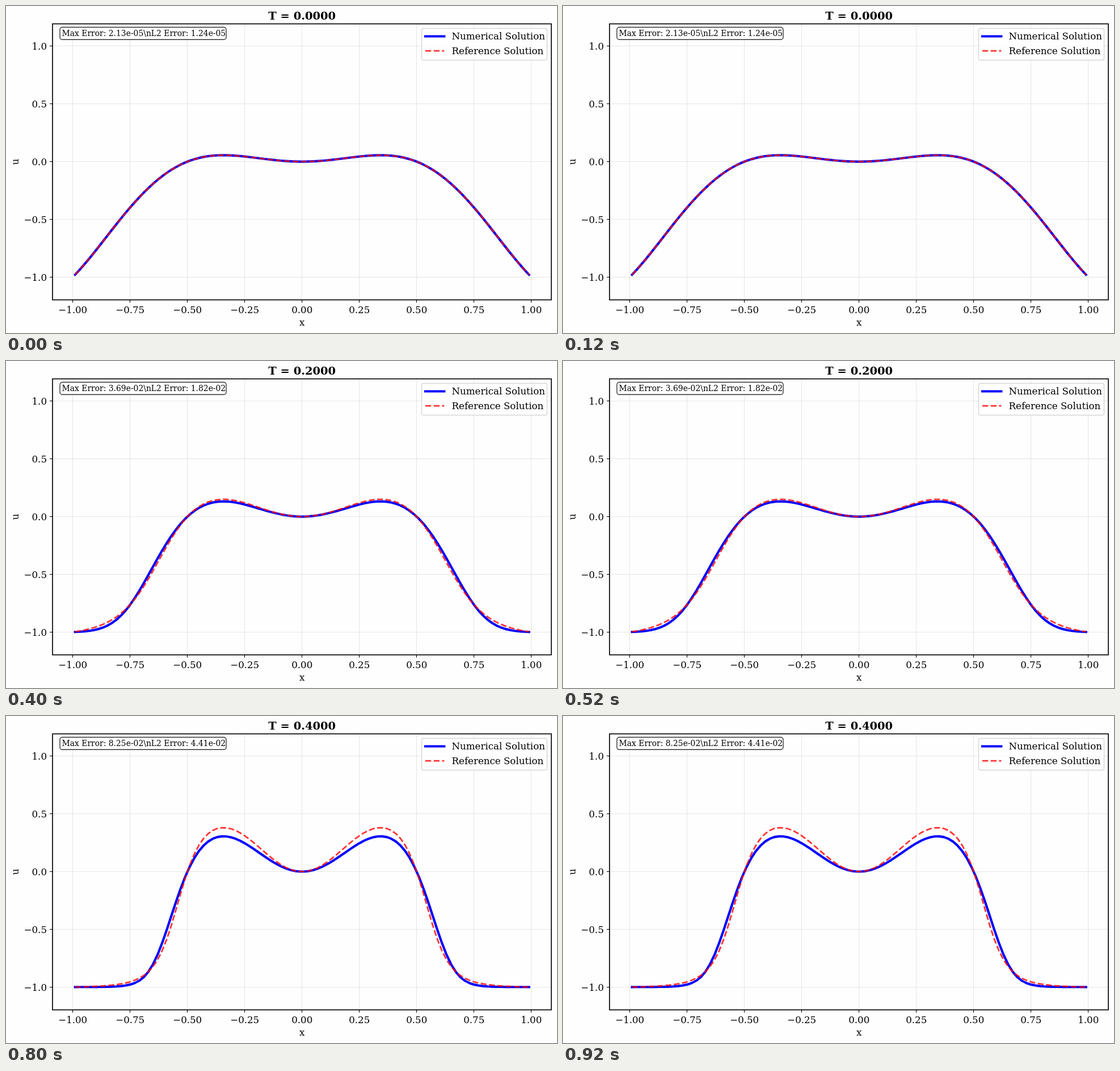
Write an HTML page that moves like this. It is 971 by 577 pixels and loops after 1 s.

```html
<!DOCTYPE html>
<html lang="en">
<head>
<meta charset="utf-8">
<style>
  html, body { margin: 0; width: 100%; height: 100%; overflow: hidden; background: #fefefe; }
  svg { display: block; width: 100%; height: 100%; }
  text { font: 16.67px "DejaVu Serif", "Noto Serif", serif; white-space: pre; }
  .title { font-size: 19.44px; font-weight: bold; }
  .info { font-size: 13.89px; }
  .mid { text-anchor: middle; }
  .end { text-anchor: end; }
  path { fill: none; }
  .grid { stroke: #b0b0b0; stroke-opacity: .3; stroke-width: 1.11; }
  .tick { stroke: #000; stroke-width: 1.11; }
  .num { stroke: #00f; stroke-width: 4.17; stroke-linecap: square; stroke-linejoin: round; }
  .ref { stroke: #f00; stroke-opacity: .8; stroke-width: 2.78; stroke-dasharray: 10.28 4.44; stroke-linejoin: round; }
</style>
</head>
<body>
<svg viewBox="0 0 971 577">
  <g id="axes"></g>
  <path id="num" class="num"/>
  <path id="ref" class="ref"/>
  <rect x="82" y="31.5" width="879" height="487" fill="none" stroke="#000" stroke-width="1.67"/>
  <text id="title" class="title mid" x="521.7" y="23.5"></text>
  <text class="mid" x="521.7" y="563.5">x</text>
  <text class="mid" transform="translate(21.5 275) rotate(-90)">u</text>
  <rect x="95" y="37.5" width="293" height="21.8" rx="4.2" fill="#fff" fill-opacity=".8" stroke="#000" stroke-opacity=".8" stroke-width="1.39"/>
  <text id="info" class="info" x="98.6" y="53"></text>
  <rect x="732.5" y="39.5" width="221" height="56" rx="3.3" fill="#fff" fill-opacity=".8" stroke="#ccc" stroke-opacity=".8" stroke-width="1.39"/>
  <path class="num" d="M739 53.5h33.3"/>
  <path class="ref" d="M739 79.2h33.3"/>
  <text x="785.5" y="59.3">Numerical Solution</text>
  <text x="785.5" y="85">Reference Solution</text>
</svg>
<script>
const $ = id => document.getElementById(id);
const px = x => 521.7 + 404 * x;
const py = u => 274.6 - 203.7 * u;
const snap = v => Math.floor(v) + .5;
const label = (v, digits) => v.toFixed(digits).replace('-', '\u2212');

const errors = [
  ['2.13e-05', '1.24e-05'],
  ['2.23e-02', '9.83e-03'],
  ['3.69e-02', '1.82e-02'],
  ['6.00e-02', '2.84e-02'],
  ['8.25e-02', '4.41e-02']
];

// Allen-Cahn reaction u' = 5(u - u^3)
const initial = x => x * x * Math.cos(Math.PI * x);
const euler = (u, dt) => u + 5 * dt * (u - u ** 3);

function exact(x, t) {
  const u = initial(x), growth = Math.exp(5 * t);
  return u * growth / Math.sqrt(1 + u * u * (growth * growth - 1));
}

function numerical(x, steps) {
  let u = initial(x);
  for (let i = 0; i < steps; i++) u = euler(euler(u, .022), .078);
  return u;
}

function curve(f) {
  const points = Array.from({ length: 100 }, (_, i) => {
    const x = -.99 + .02 * i;
    return px(x).toFixed(2) + ' ' + py(f(x)).toFixed(2);
  });
  return 'M' + points.join('L');
}

function drawAxes() {
  let out = '';
  for (let i = -4; i <= 4; i++) {
    const x = snap(px(i / 4));
    out += `<path class="grid" d="M${x} 32V518"/><path class="tick" d="M${x} 518.5v4.9"/>
      <text class="mid" x="${px(i / 4)}" y="541.5">${label(i / 4, 2)}</text>`;
  }
  for (let i = -2; i <= 2; i++) {
    const y = snap(py(i / 2));
    out += `<path class="grid" d="M82 ${y}H961"/><path class="tick" d="M82 ${y}h-4.9"/>
      <text class="end" x="72" y="${py(i / 2) + 6.2}">${label(i / 2, 1)}</text>`;
  }
  $('axes').innerHTML = out;
}

let shown = -1;
function draw(now) {
  const step = Math.floor(now % 1000 / 200);
  if (step !== shown) {
    shown = step;
    const t = step / 10, [max, l2] = errors[step];
    $('num').setAttribute('d', curve(x => numerical(x, step)));
    $('ref').setAttribute('d', curve(x => exact(x, t)));
    $('title').textContent = `T = ${t.toFixed(4)}`;
    $('info').textContent = `Max Error: ${max}\\nL2 Error: ${l2}`;
  }
  requestAnimationFrame(draw);
}

drawAxes();
draw(performance.now());
</script>
</body>
</html>
```
